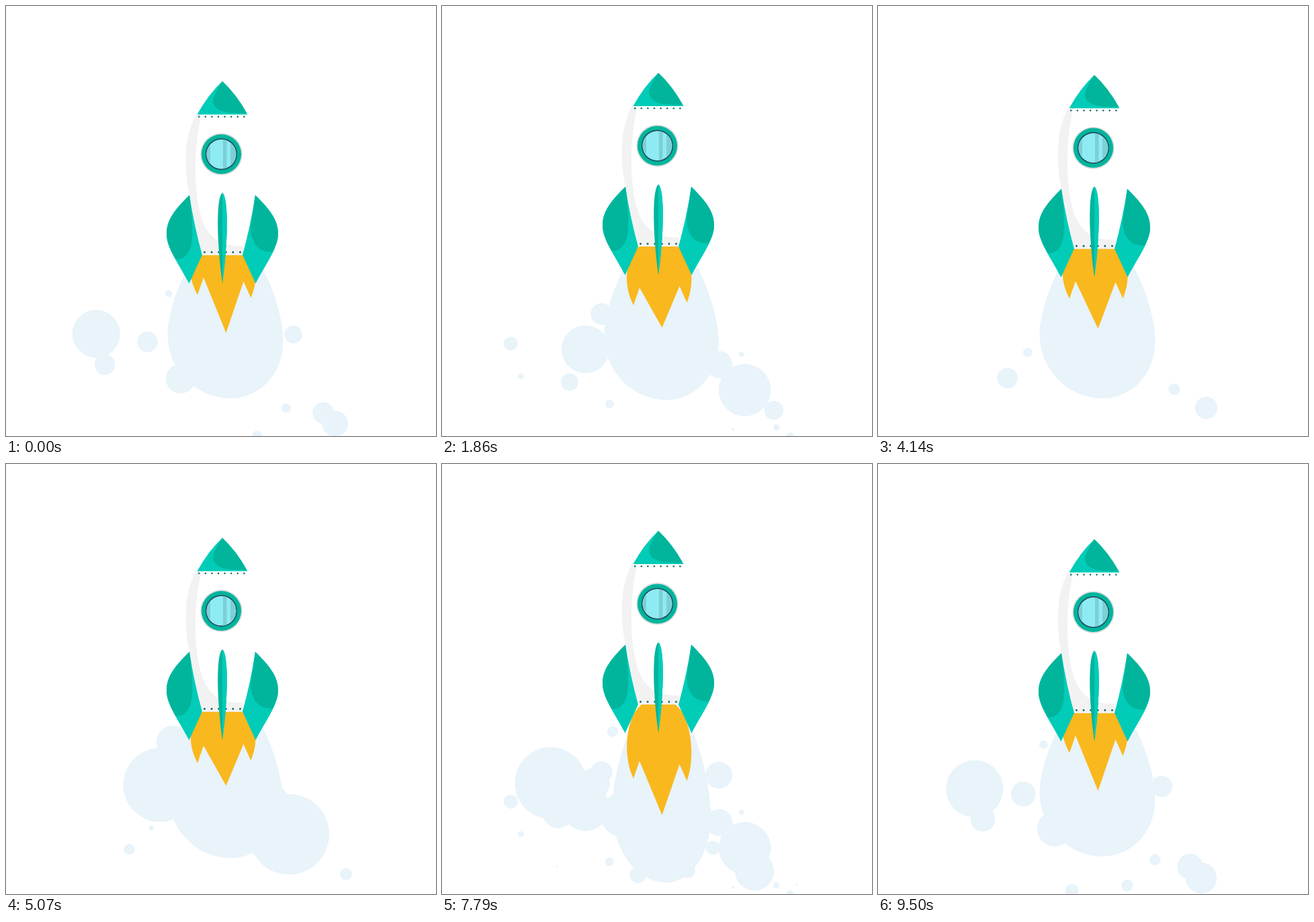
Recreate the animation shown at these times as an HTML page with a canvas. Size 640 by 640 pixels, loop 9570 ms.

```html
<!DOCTYPE html>
<html lang="en">
<head>
<meta charset="utf-8">
<title>Rocket</title>
<style>
html, body { margin: 0; width: 100%; height: 100%; overflow: hidden; background: #fff; }
canvas { display: block; width: 640px; height: 640px; }
</style>
</head>
<body>
<canvas id="stage" width="640" height="640"></canvas>
<script>
const LOOP = 9570, EMERGE = 350;
const SMOKE = '#e8f3fa', FIRE = '#f9b81d', LIGHT = '#00ccb8', DARK = '#00b59c', RIVET = '#14665f';
const ctx = document.getElementById('stage').getContext('2d');

const clamp = k => Math.min(1, Math.max(0, k));
const smooth = k => k * k * (3 - 2 * k);

// The rocket sinks and rises in turn, one 600 ms move from each of these times
const moves = [0, 700, 1260, 3130, 3740, 4620, 5220, 5820, 6420, 8080];
const bob = t => 12.5 * moves.reduce(
  (y, start, i) => y + (i % 2 ? 1 : -1) * smooth(clamp((t - start) / 600)), 1);

// Engine surges, strong and weak in turn
const surges = [700, 1860, 2540, 3900, 4400, 5070, 5750, 7110, 7790, 8700];
const thrust = t => Math.max(...surges.map(
  (peak, i) => (i % 2 ? 0.4 : 1) * smooth(clamp(1 - Math.abs(t - peak) / 340))));

// Puffs are x, y, r where they leave the plume; drift is their way until they vanish
const bursts = [
  {
    births: [700, 1430, 2150, 2830, 3600, 4400, 6430, 7360, 7790, 8450, 9370],
    life: 520,
    drift: x => [0.45 * (x - 322), 110 - 0.48 * Math.abs(x - 322)],
    shrink: k => 1 - k ** 1.15,
    puffs: [[162, 475, 53.5], [173, 519, 23], [227, 475, 23], [254, 398, 8], [269, 522, 33], [412, 463, 20],
      [403, 571, 10.5], [366, 605, 11], [292, 611, 12.5], [450, 587, 24], [465, 606, 29]]
  },
  {
    births: [700, 1440, 1690, 2250, 3170, 3750, 4430, 4580, 5070, 6010, 7170, 7620, 8400],
    life: 680,
    drift: (x, y) => [0.95 * (x - 297), 0.69 * (670 - y)],
    shrink: k => (1 - k) ** 1.5,
    puffs: [[229.5, 477.5, 55], [249, 414, 25], [421, 551, 60], [390, 505, 31]]
  }
];

function fill(color, path) {
  ctx.fillStyle = color;
  ctx.fill(typeof path === 'string' ? new Path2D(path) : path);
}

function disc(color, x, y, r) {
  ctx.fillStyle = color;
  ctx.beginPath();
  ctx.arc(x, y, r, 0, Math.PI * 2);
  ctx.fill();
}

function drawPuffs(t) {
  for (const { births, life, drift, shrink, puffs } of bursts) {
    for (const birth of births) {
      const age = (t - birth + EMERGE + LOOP) % LOOP - EMERGE;
      if (age >= life) continue;
      const out = clamp(1 + age / EMERGE), k = clamp(age / life);
      for (const [x, y, r] of puffs) {
        const [dx, dy] = drift(x, y);
        disc(SMOKE, 326 + (x - 326) * out + dx * k, 460 + (y - 460) * out + dy * k, r * out * shrink(k));
      }
    }
  }
}

const plume = new Path2D('M0 0C45 0 86 105 86 157C86 207 50 242 8 242C-44 242 -86 199 -86 147C-86 103 -45 0 0 0Z');

function drawPlume(u) {
  ctx.save();
  ctx.translate(326.5, 340);
  ctx.scale(1 - 0.145 * u ** 3, 1.008 + 0.161 * u ** 3);
  fill(SMOKE, plume);
  ctx.restore();
}

function drawFlame(top, u) {
  const tip = 486.5 - 56 * u + 92 * u * u;
  const left = 38 * u, right = 37 * u ** 1.8, inset = 6 * u;
  fill(FIRE, `M${291 + inset} ${top}C274 ${top + 17} 268 ${396 + left} 285 ${430 + left}` +
    `L294 ${404 + left}L327.5 ${tip}L353.5 ${410 + right}L364.5 ${434.5 + right}` +
    `C378 ${400 + right} 371 ${top + 17} ${353 - inset} ${top}Z`);
}

const body = new Path2D('M286 148C262 186 264 238 274 280L292 358H353L370 280C380 238 382 186 358 148Z');
const shade = new Path2D('M283 149C263 184 266 232 273 269C277 300 284 333 292 358H353V344.5' +
  'C325 345 306 338 294 311C279 277 278 200 291 149Z');
const glass = new Path2D();
glass.arc(320.5, 208, 22, 0, Math.PI * 2);

function drawWindow() {
  disc('#d9dcdc', 320.5, 208, 31.3);
  disc(DARK, 320.5, 208, 29.6);
  disc('#24475a', 320.5, 208, 23.6);
  ctx.save();
  ctx.clip(glass);
  ctx.fillStyle = '#8eebf3';
  ctx.fillRect(297, 185, 47, 47);
  ctx.fillStyle = '#7bd0d5';
  for (const [x, w] of [[297, 7], [323, 5.5], [334, 10]]) ctx.fillRect(x, 185, w, 47);
  ctx.restore();
}

function drawRocket() {
  fill('#fff', body);
  fill('#f2f2f2', shade);

  fill(LIGHT, 'M322 99.5Q301 119 284.5 149H359.5Q343 119 322 99.5Z');
  fill(DARK, 'M322 99.5C312 115 306 126 309 133C314 147 338 147.5 358.5 147.3Q343 119 322 99.5Z');
  for (let i = 0; i < 8; i++) disc(RIVET, 287.2 + i * 9.6, 152.3, 1.25);
  for (let i = 0; i < 6; i++) disc(RIVET, 295.5 + i * 10.6, 354, 1.45);
  drawWindow();

  fill(LIGHT, 'M273 269C252 290 239 305 239 327C239 347 255 368 272.5 400.5L292 358Q280 315 273 269Z');
  fill(DARK, 'M273 269C252 290 239 305 239 327C239 340 246 353 252.5 364.5C268 366 277 350 277 330C278 315 276 290 273 269Z');
  fill(LIGHT, 'M371 269C392 290 405 305 405 327C405 347 389 368 371.5 400.5L352 358Q364 315 371 269Z');
  fill(DARK, 'M371 269C392 290 405 305 405 327C405 336 401 345 396.5 353.5C375 354 365 340 364 318Z');

  fill(DARK, 'M322 265.5C331 272 331 335 322 400C313 335 313 272 322 265.5Z');
  fill(LIGHT, 'M322 265.5C331 272 331 335 322 400Z');
}

function draw() {
  const t = performance.now() % LOOP;
  const y = bob(t), u = thrust(t);
  ctx.fillStyle = '#fff';
  ctx.fillRect(0, 0, 640, 640);
  drawPuffs(t);
  drawPlume(u);
  drawFlame(358 + y, u);
  ctx.save();
  ctx.translate(0, y);
  drawRocket();
  ctx.restore();
  requestAnimationFrame(draw);
}
draw();
</script>
</body>
</html>
```
